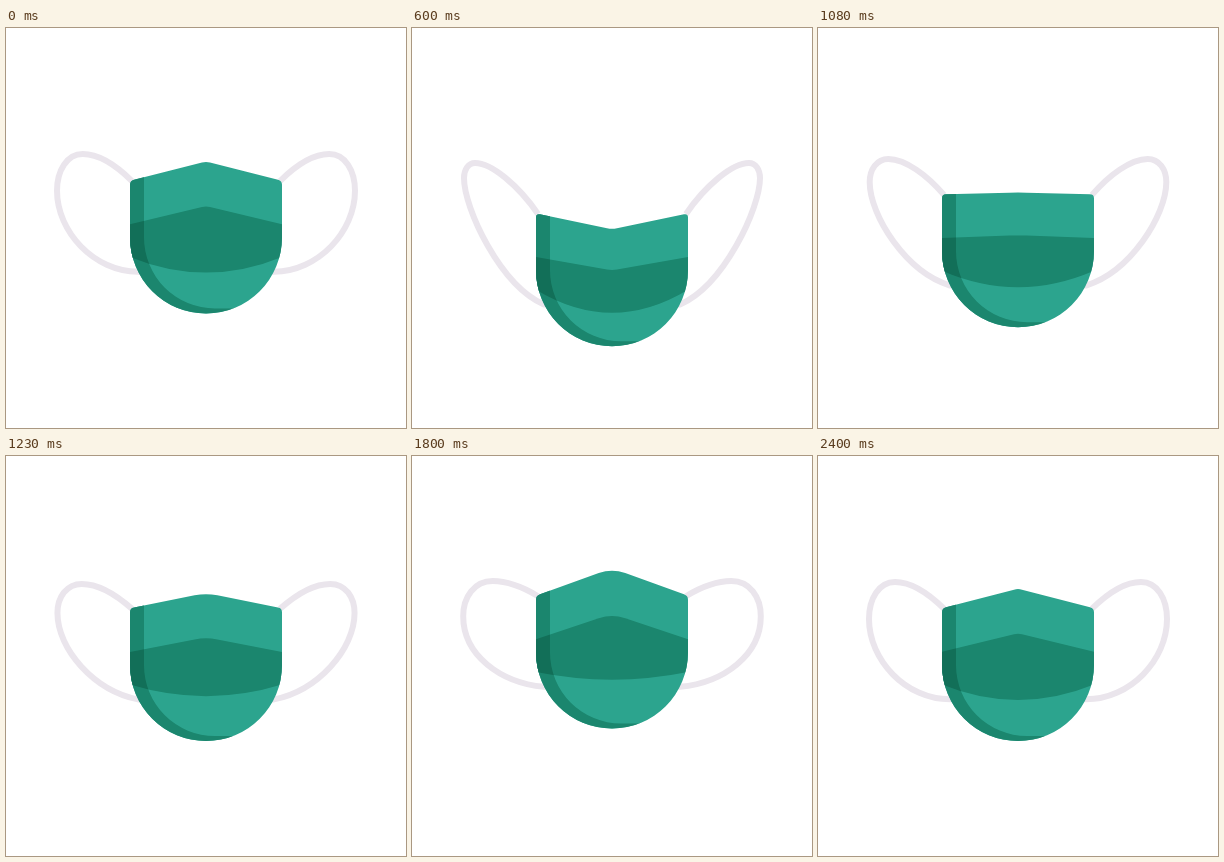
Recreate the animation shown at these times as an HTML page. Size 400 px wide and 400 px high, loop 4.43 s.

```html
<!DOCTYPE html>
<html lang="en">
<head>
<meta charset="utf-8">
<title>Face mask</title>
<style>
html, body { margin: 0; width: 100%; height: 100%; overflow: hidden; background: #fff; }
svg { display: block; width: 100vw; height: 100vh; }
</style>
</head>
<body>
<svg viewBox="0 0 400 400">
  <defs>
    <path id="strap"/>
    <clipPath id="maskClip"><path id="outline"/></clipPath>
    <path id="band"/>
    <clipPath id="bandClip"><use href="#band"/></clipPath>
    <path id="shade"/>
  </defs>
  <g fill="none" stroke="#eae5ec" stroke-width="6">
    <use href="#strap"/>
    <use href="#strap" transform="matrix(-1 0 0 1 400 0)"/>
  </g>
  <g clip-path="url(#maskClip)" fill="#1b866e">
    <rect width="400" height="400" fill="#2ca48e"/>
    <use href="#shade"/>
    <use href="#band"/>
    <g clip-path="url(#bandClip)"><use href="#shade" fill="#126f58"/></g>
  </g>
</svg>
<script>
const LOOP = 4430, STEP = 30, END = 2400;
const MID = 200, R = 76, LEFT = MID - R, RIGHT = MID + R;

// chin: centre height of the lower arc, bend: how far the top edge folds down in the middle,
// round: half width of that fold, sag: drop of the lower pleat,
// topX, topY: highest point of the strap, pull: how tightly the strap is drawn
const rest = { chin: 209, bend: -19.6, round: 4, sag: 15.5, topX: 77, topY: 126, pull: 0 };
const low = { chin: 242.3, bend: 16, round: 5, sag: 23, topX: 63, topY: 135, pull: 13 };
const high = { chin: 195.5, bend: -28, round: 14, sag: 7, topX: 81, topY: 125, pull: 3 };

const moves = [
  { from: rest, to: low, start: -45, end: 615 },
  { from: low, to: high, start: 760, end: 1490 },
  { from: high, to: rest, start: 1680, end: 2400 }
];

const set = (id, d) => document.getElementById(id).setAttribute("d", d);
const ease = x => x * x * (3 - 2 * x);
const mix = (a, b, k) => a + (b - a) * k;

function poseAt(t) {
  const { from, to, start, end } = moves.filter(m => t >= m.start).pop();
  const k = ease(Math.min(1, (t - start) / (end - start)));
  return Object.fromEntries(Object.keys(from).map(key => [key, mix(from[key], to[key], k)]));
}

// Line from side to side with a rounded fold in the middle
function fold(side, bend, round) {
  const y = side + bend * (1 - round / R);
  return `L${MID - round} ${y}Q${MID} ${side + bend} ${MID + round} ${y}`;
}

function maskPath({ chin, bend, round }) {
  const side = chin - 56.8, corner = 4, near = side + bend * corner / R;
  return `M${LEFT} ${side + corner}Q${LEFT} ${side} ${LEFT + corner} ${near}` +
    fold(side, bend, round) +
    `L${RIGHT - corner} ${near}Q${RIGHT} ${side} ${RIGHT} ${side + corner}` +
    `V${chin}A${R} ${R} 0 0 1 ${LEFT} ${chin}Z`;
}

function bandPath({ chin, bend, round, sag }) {
  const upper = chin - 13.2, lower = chin + 19.5;
  return `M${LEFT} ${upper}${fold(upper, 0.9 * bend - 1, round)}L${RIGHT} ${upper}` +
    `V${lower}Q${MID} ${lower + 2 * sag} ${LEFT} ${lower}Z`;
}

function shadePath({ chin }) {
  const r = 71, x = LEFT + 14;
  return `M${LEFT} 0H${x}V${chin}a${r} ${r} 0 0 0 ${r} ${r}h19v9H${LEFT}Z`;
}

function strapPath({ chin, topX, topY, pull }) {
  const x = 126, y = chin - 56.3;
  const outX = 51 + pull / 13, outY = 163 - pull;
  const endX = 132, endY = chin + 34.3;
  return `M${x} ${y}` +
    `C${mix(x, topX, 0.3)} ${mix(y, topY, 0.54)} ${topX + 17} ${topY} ${topX} ${topY}` +
    `C${mix(topX, outX, 0.62)} ${topY} ${outX} ${mix(outY, topY, 0.55)} ${outX} ${outY}` +
    `C${outX} ${outY + 41 - 0.85 * pull} ${endX - 44} ${endY - 1.5 * pull} ${endX} ${endY}h12`;
}

function draw(t) {
  const pose = poseAt(t);
  set("strap", strapPath(pose));
  set("outline", maskPath(pose));
  set("band", bandPath(pose));
  set("shade", shadePath(pose));
}

function tick() {
  const t = performance.now() % LOOP;
  draw(Math.min(END, Math.floor(t / STEP) * STEP));
  requestAnimationFrame(tick);
}
tick();
</script>
</body>
</html>
```
